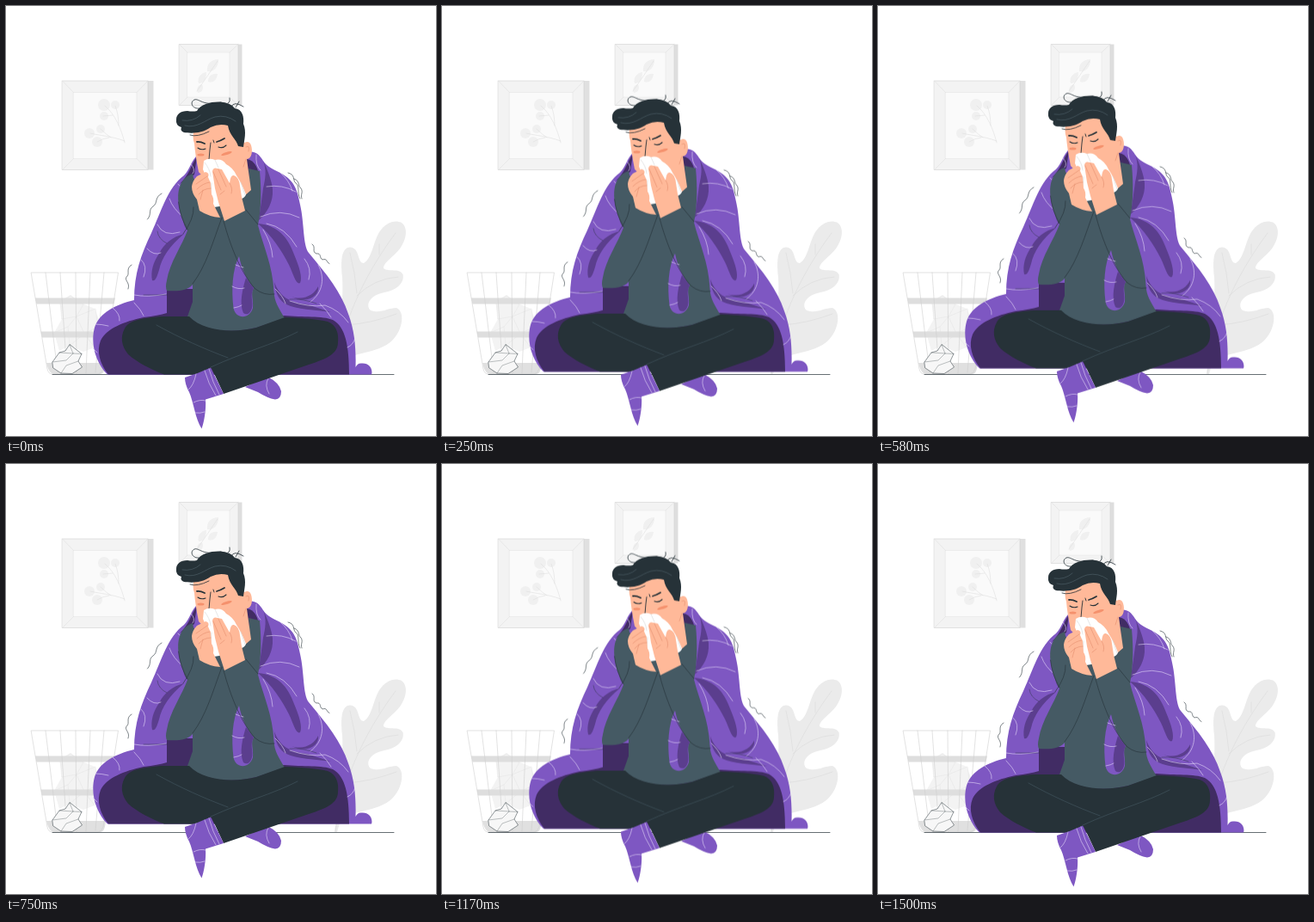
These frames come from a looping animation (500x500 px, 1540 ms). An HTML page:

```html
<!DOCTYPE html>
<html lang="en">
<head>
<meta charset="utf-8">
<title>Under the blanket</title>
<style>
html, body { margin: 0; width: 100%; height: 100%; overflow: hidden; background: #fff; }
svg { display: block; width: 100vw; height: 100vh; stroke-width: .6; stroke-linecap: round; stroke-linejoin: round; }
.line { fill: none; }
.ink { stroke: #263238; }
.stripe { stroke: #e4d8f8; }
.grey { stroke: #e0e0e0; }
.blanket { fill: #7e57c2; }
.fold { fill: #5b3e8e; }
.inside { fill: #412c64; }
.knit { fill: #455a64; }
.dark { fill: #263238; }
.skin { fill: #ffb999; }
.crease { stroke: #e58f70; }
</style>
</head>
<body>
<svg viewBox="0 0 500 500">
  <g id="wall">
    <path d="M165 87H171.500V190.500H165Z" fill="#e0e0e0"/>
    <path d="M65.500 87H165V190.500H65.500Z" fill="#f3f3f3" stroke="#d2d2d2"/>
    <path d="M78.500 100.500H152V177.500H78.500Z" fill="#fafafa" stroke="#e6e6e6"/>
    <path class="line grey" d="M65.500 87 78.500 100.500M165 87 152 100.500M65.500 190.500 78.500 177.500M165 190.500 152 177.500"/>
    <g fill="#f0f0f0">
      <circle cx="114" cy="115" r="7"/><circle cx="127" cy="115" r="5"/>
      <circle cx="114" cy="128" r="5"/><circle cx="97" cy="148" r="6"/>
      <circle cx="110" cy="143" r="5"/><circle cx="106" cy="158" r="6"/>
    </g>
    <path class="line grey" d="M138 159C134 143 127 126 115 116M131 139Q131 126 127 116M124 127 113 128M138 157C122 151 110 151 98 148M122 153Q116 149 110 143M120 153Q112 154 106 158"/>

    <path d="M270 44.500H274.500V115.500H270Z" fill="#dedede"/>
    <path d="M201.500 44.500H270V115.500H201.500Z" fill="#f3f3f3" stroke="#d2d2d2"/>
    <path d="M211 54H260V106H211Z" fill="#fafafa" stroke="#e8e8e8"/>
    <path class="line grey" d="M201.500 44.500 211 54M270 44.500 260 54M201.500 115.500 211 106M270 115.500 260 106"/>
    <path d="M247 62C239 62 233 67 234 76C241 77 247 72 247 62ZM233 77C226 78 222 84 224 90C230 90 233 85 233 77ZM246 79C239 78 235 82 235 88C241 90 245 86 246 79ZM228 91C223 92 221 96 223 101C229 100 230 96 228 91Z" fill="#f0f0f0"/>
    <path class="line grey" d="M246 64Q234 82 222 99"/>
  </g>

  <g id="plant">
    <path d="M382 428C386 398 393 350 391 315C389 296 390 281 400 280.500C412 281 408 299 416 299C426 293 427 274 434 263C441 252 452 248 460 252C468 258 465 271 460 279C454 290 439 297 439 305C445 310 457 304 461.500 312C464 323 452 331 440 333C424 336 417 347 424 354C436 358 444 351 454 351C464 355 462 376 449 389C434 403 408 403 390 411L385 428Z" fill="#ebebeb"/>
    <path class="line" stroke="#dadada" d="M383 427C391 370 413 318 453 264M400 287Q406 310 408 334M408 337Q428 317 456 315M396 371Q425 369 454 358M434 289 434 277"/>
  </g>

  <g id="bin">
    <path d="M53 415H116Q115 428 110 428H56Q50 428 47 415Z" fill="#e0e0e0"/>
    <path d="M62 343 75 336 89 346 103 352 110 369 103 397 90 402 74 395 62 401 56 380 65 364Z" fill="#f3f3f3"/>
    <path class="line" stroke="#e6e6e6" d="M64 344 75 337 90 347 82 361 65 364ZM82 361 104 352 107 373 91 381 82 361 72 373 56 380M72 373 74 395 91 381 103 397"/>
    <path d="M34 339.500H127L125.500 346.500H35.500ZM40.500 378.500H121L119.500 385.500H42Z" fill="#dedede"/>
    <path class="line" stroke="#cfcfcf" d="M29.500 310H130.500L113 422Q111 428 107 428H54Q49 428 48 422ZM46 310 60 426M63 310 71 427M81 310 82 428M98 310 93 427M114 310 104 426"/>
  </g>

  <path class="line ink" stroke-width=".7" d="M54 428.500H451"/>

  <g id="paper" stroke-width=".5">
    <path class="ink" d="M54 414 62 403 69 401 74 393.500 88 404.500 84 413 88.500 420 77 427.500 64 427 55 421Z" fill="#f7f7f7"/>
    <path class="line ink" d="M62 403 78 404 88 404.500M78 404 70 412 54 414M84 413 70 418 64 427M74 394 78 404" opacity=".6"/>
  </g>

  <g id="person">
    <g class="line ink">
      <path d="M181 218C172 223 177 229 171 233C165 237 170 242 164.500 248"/>
      <path d="M146 301C139 305 144 311 141 314C136 319 145 321 142 329"/>
      <path d="M328 194C337 196 333 203 337 206C342 209 338 217 342 224M335 201C342 203 339 209 343 212C346 217 342 219 344 224"/>
      <path d="M356 277C361 280 355 286 361 288C367 287 364 293 368 295C374 293 372 298 376 299.500"/>
    </g>

    <path class="blanket" d="M223 173C215 180 214 190 207 197C188 211 181 238 169 264C157 289 149 311 149 342C128 347 108 357 103 374C98 392 104 415 118 428.600H425C427 422 422 415 414 415.500C410 415 408 417 406.500 420C407 400 406 379 398 358C390 333 373 312 352 287C345 278 347 253 342 231C338 209 333 202 319 194C309 189 304 187 299 180C294 171 288 168 281 170L240 180Z"/>

    <g class="inside">
      <path d="M119 428.600C109 416 105 401 110 389C117 375 137 367 160 362Q177 360 187 357V329H218V360H324C345 362 368 360 380 365C395 373 399 396 399 428.600Z"/>
      <path d="M278 178C286 178 291 184 293 192V210H280Z"/>
      <path d="M222 175C215 186 213 196 202 207Q211 201 219 196Z"/>
    </g>

    <g class="fold">
      <path d="M299 180C303 190 302 200 299 212C297 228 295 240 294 249C304 240 311 228 310 213C309 203 304 190 299 180Z"/>
      <path d="M293 253C316 255 328 269 335 289C341 303 345 316 342 322C337 325 334 311 329 301C321 285 309 267 293 253Z"/>
      <path d="M207 265C194 268 183 277 178 288C171 298 168 309 170 319C174 321 176 313 178 307C181 293 190 279 207 265Z"/>
      <path d="M312 321C318 338 330 345 350 347L378 356C359 353 338 353 326 347C318 343 313 334 312 321Z"/>
      <path d="M332 338C347 343 359 335 363 326C365 337 350 347 332 338Z"/>
    </g>

    <g class="line stripe">
      <path d="M200 207Q209 214 201 222M190 224Q194 236 207 246M176 254Q183 269 202 263M164 282Q172 291 180 287M157 295Q165 302 160 315M149 336Q164 339 186 335M149 345Q157 353 160 360M124 351Q133 358 132 366M104 370Q111 370 119 372M101 398 106 403"/>
      <path d="M215 184Q221 190 217 195M291 173Q290 186 296 191M303 210Q321 207 337 216M296 245Q319 235 341 246M303 253Q325 257 338 280M319 194Q329 202 333 215M299 260Q309 276 310 292"/>
      <path d="M363 301C371 315 369 333 354 344M347 294Q356 305 352 318M330 343Q353 351 371 348Q388 354 398 368M365 346Q374 355 378 362M397 397Q404 394 406 386M313 329Q322 337 325 346"/>
    </g>
    <path class="line ink" d="M207 247Q206 256 211 260M176 262Q177 271 187 276M330 341Q345 340 361 346M160 336H187" opacity=".7"/>

    <path class="knit" d="M217 195C203 200 199 213 200.500 228C202 243 207 253 211 261C205 278 190 299 187 319Q185 327 187 331C200 332 211 331 217 324V344L211 361C230 379 262 381 291 374L324 363C317 351 312 344 311.500 332C310 301 299 279 293 255C297 235 297 213 295 192L282 189 284 214 238 227 218 200Z"/>
    <path class="blanket" d="M271 291C263 307 262 330 264.500 351C267 365 284 364 287 351C288 342 284 334 288 328C280 318 274 306 271 291Z"/>
    <path class="fold" d="M276 357C271 346 275 329 279 316L288 328C283 337 288 344 286 351C284 358 280 360 276 357Z"/>
    <path class="line stripe" d="M267 301Q272 303 276 304M263 326Q270 330 277 328M265 351Q271 350 274 348"/>
    <path class="line ink" d="M251 246C241 273 233 302 217 323M218 234Q219 247 206 265M253 250C261 280 274 312 290 329Q300 337 312 335M200.500 228Q202 244 211 260M279 237 293 254"/>

    <path class="blanket" d="M278 443 304 431Q318 438 320 448Q320 457 313 457.500Q304 456 293 449Z"/>
    <path class="line stripe" d="M305 433Q300 441 306 451"/>
    <path class="dark" d="M138 375C144 364 161 363 181 361Q200 361 213 361C229 378 264 381 291 374L324 362Q357 363 374 367C385 371 387 382 386 391C386 404 374 410 352 417L253 451 239 421 236 428.600H184C170 423 153 415 142 405Q130 390 138 375Z"/>
    <path class="line" stroke="#455a64" d="M175 371C202 386 231 399 258 409M339 379C310 394 277 402 238 420"/>
    <path class="blanket" d="M208 432Q224 427 238 420.500L253 451 232 457.500C233 470 230 485 227.500 491.500C220 480 218 460 213 449Q208 440 208 432Z"/>
    <path class="line stripe" d="M221 428Q218 442 212 446M231 424Q235 439 244 453M236 422Q240 437 248 452M218 461Q226 457 232 459M220 473Q226 474 231 472"/>

    <path class="skin" d="M219 143Q216 151 219 160Q220 173 224 193L241 211 269 228 285 214 280 178C286 178 287 168 285 162Q283 156 277 159L275 130 240 127Z"/>
    <path class="line crease" d="M279 164Q284 161 282 169M279 178 276 187"/>
    <path class="dark" d="M198 132C198 126 203 122 211 122Q217 123 222 122C226 114 239 111 249 111.500Q261 112 266 119C275 120 277 129 276 137C280 146 277 156 276 164L270 163C268 155 260 151 258 139Q248 136 238 141C227 149 214 148 207 147Q202 145 204 141Q197 139 198 132Z"/>
    <path class="line ink" stroke-width=".8" d="M224 119C217 120 213 112 219 109C225 107 228 117 250 112M258 113Q261 112 260 107M262 117Q265 110 276 117M267 118 271 111M214 150Q222 153 236 146"/>
    <path class="line" stroke="#51636c" d="M208 139C222 143 232 132 243 129Q256 126 267 134M205 133Q217 135 226 127"/>
    <g class="line ink">
      <path stroke-width="1.800" d="M222 158Q226 157.500 231 160M245 158Q249 157 254 154"/>
      <path stroke-width="1.100" d="M223 165Q227 168 232 166M247 164Q252 166 256 162"/>
      <path stroke-width=".9" d="M238 159 237 167 236 179M241 156 242 159"/>
    </g>
    <g fill="#f5916d">
      <ellipse cx="226.500" cy="173" rx="4" ry="1.500"/>
      <ellipse cx="256.500" cy="171.500" rx="6.500" ry="1.600" transform="rotate(-17 256.500 171.500)"/>
    </g>

    <path d="M230 180Q236 176 243 179Q251 177 256 184Q264 188 268 197Q274 206 279 219Q278 224 270 225L248 233 236 235 237 209 229 190Z" fill="#fff"/>
    <path class="line" stroke="#d5d5d5" d="M231 182Q237 189 238 198M243 179 247 188M273 205 278 220M239 206 237 231"/>
    <path class="skin" d="M216 210Q217 203 222 198L232 193Q237 194 235 199L238 206 239 219Q242 223 241 230L249 246Q236 245 225 238L222 225Q216 218 216 210Z"/>
    <path class="skin" d="M240 192Q241 187 246 189L251 190 260 206Q261 196 265 197Q271 199 272 209L274 222 278 238 254 250 247 228 243 212Z"/>
    <path class="line crease" d="M221 207 234 198M222 213Q229 206 237 205M224 219Q230 212 238 212M226 225 229 214M241 193 250 214M247 190 256 210M260 206Q264 212 262 218M249 219 254 215"/>
  </g>
</svg>
<script>
const LOOP = 1540, STEPS = 37, HALF = 18;
const at = (step, y) => ({
  offset: step / STEPS,
  transform: `translateY(${y}px)`,
  easing: `steps(${HALF})`
});
// rise, sink, then one resting step
document.getElementById('person').animate(
  [at(0, 0), at(HALF, -10), at(2 * HALF, 0), at(STEPS, 0)],
  { duration: LOOP, iterations: Infinity }
);
</script>
</body>
</html>
```
